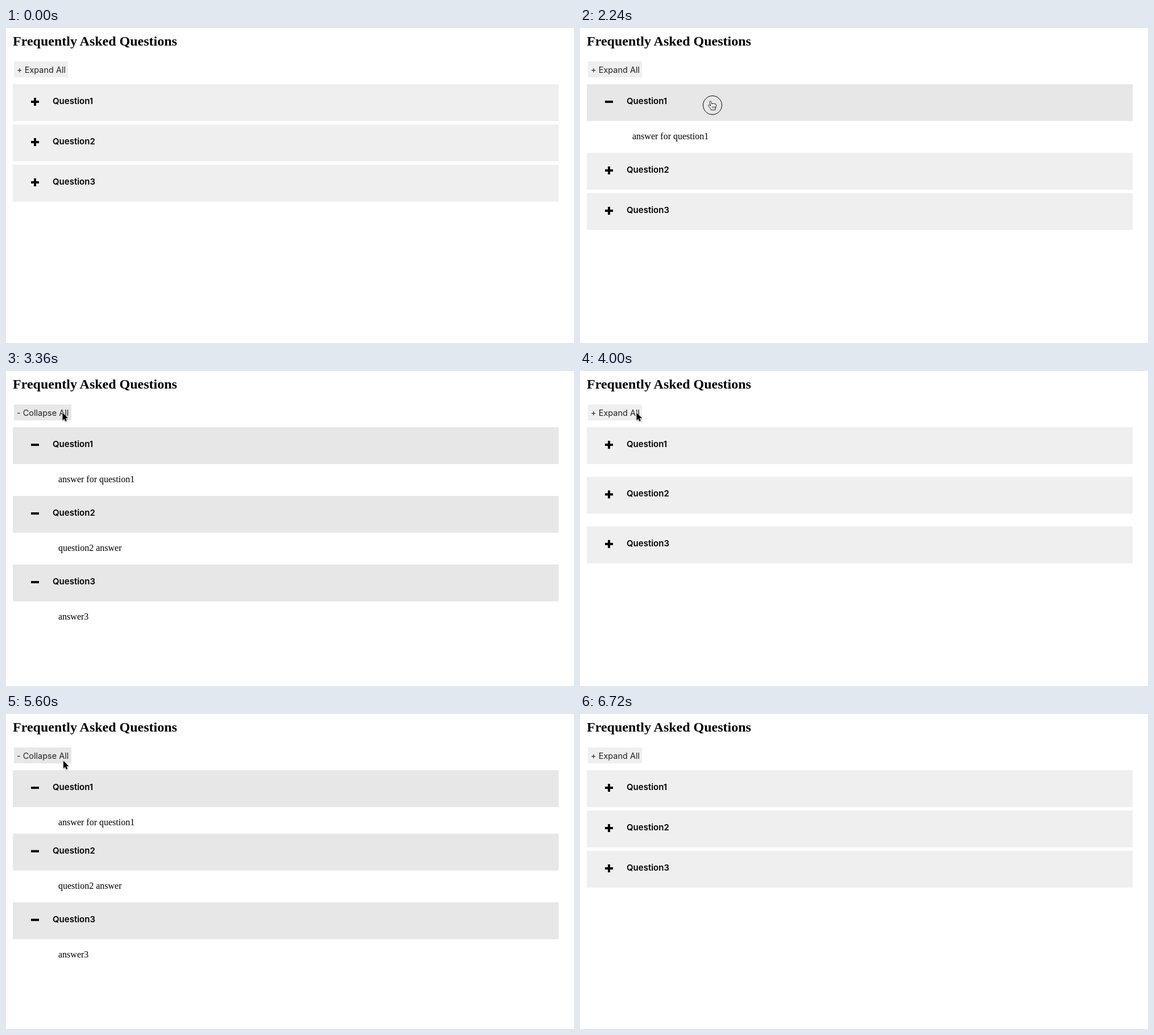
Recreate the animation shown at these times as an HTML page. Size 999 by 555 pixels, loop 7200 ms.

```html
<!DOCTYPE html>
<html lang="en">
<head>
<meta charset="utf-8">
<title>FAQ accordion</title>
<style>
  html, body { margin: 0; width: 100%; height: 100%; overflow: hidden; background: #fff; }
  svg { display: block; }
  .title { font: bold 24px "Liberation Serif", serif; }
  .answer { font: 16px "Liberation Serif", serif; }
  .question { font: 600 15px Inter, sans-serif; }
  .button { font: 14.5px Inter, sans-serif; }
</style>
</head>
<body>
<svg id="stage" width="999" height="555" viewBox="0 0 999 555">
  <text class="title" x="12" y="31">Frequently Asked Questions</text>
  <rect id="buttonBox" x="14" y="59" height="28"/>
  <text id="buttonText" class="button" x="19" y="79"></text>
  <g id="list"></g>
  <g id="cursor">
    <circle id="ring" r="16.5" fill="none" stroke="#000"/>
    <path id="arrow" d="M-4-7.5v13.2l3-2.8 2 4.7 2.3-1-2-4.5h4.2z" stroke="#fff" stroke-width="1" paint-order="stroke"
      style="filter:drop-shadow(0 1px 1px #0006)"/>
    <g id="hand" fill="#fff" stroke="#111" stroke-linejoin="round" stroke-linecap="round">
      <path d="M-2.6 8C-3.2 5.4-5 4-6.8 1.6-8-.2-6.2-1.4-4.6.2l1.3 1.2L-5-5.2c-.5-2.2 1.9-2.8 2.6-.8L-1-1.8c0-1.6 2.2-1.8 2.5-.2.4-1.3 2.3-1.1 2.5.3.6-1 2.3-.7 2.5.6C7 1.600 6 3.500 5.200 5.400L4.800 8z"/>
      <path d="M-.4 2v3.500M2 2v3.500M4.300 2v3.500" stroke-width=".8"/>
    </g>
  </g>
</svg>
<script>
  const LOOP = 7200, STEP = 160, SLIDE = 195;
  const ALL = [0, 1, 2];
  const ANSWERS = ["answer for question1", "question2 answer", "answer3"];

  const toggles = [
    { at: 1350, panels: [0], open: true },
    { at: 2300, panels: [0], open: false },
    { at: 3104, panels: ALL, open: true },
    { at: 3869, panels: ALL, open: false },
    { at: 4550, panels: [1], open: true },
    { at: 5441, panels: ALL, open: true },
    { at: 6110, panels: ALL, open: false }
  ];
  const clicks = [1280, 2240, 3040, 3840, 4480, 5440, 6080];
  const buttonClicks = [3040, 3840, 5440, 6080];

  // time, x, y of the cursor centre
  const route = [
    [160, 398, 272], [1120, 233, 136], [2400, 233, 136], [2880, 103.5, 81],
    [4160, 103.5, 81], [4480, 150, 204], [4800, 150, 204], [5280, 105, 90],
    [6240, 105, 90], [6560, 180, 491], [6720, 180, 491]
  ];

  const $ = id => document.getElementById(id);
  const clamp = v => Math.min(1, Math.max(0, v));
  const show = (el, on) => el.setAttribute("visibility", on ? "visible" : "hidden");

  function add(parent, tag, attrs, text = "") {
    const el = document.createElementNS("http://www.w3.org/2000/svg", tag);
    for (const name in attrs) el.setAttribute(name, attrs[name]);
    el.textContent = text;
    return parent.appendChild(el);
  }

  const items = ANSWERS.map((answer, i) => {
    const group = add($("list"), "g", {});
    const bar = add(group, "rect", { x: 12, width: 960, height: 65 });
    add(group, "path", { d: "M44 31h14", stroke: "#000", "stroke-width": 4 });
    const upright = add(group, "path", { d: "M51 24v14", stroke: "#000", "stroke-width": 4 });
    add(group, "text", { class: "question", x: 82, y: 35 }, "Question" + (i + 1));
    const panel = add(group, "svg", { y: 67, width: 999, overflow: "hidden" });
    add(panel, "text", { class: "answer", x: 92, y: 30 }, answer);
    return { group, bar, upright, panel };
  });

  function panelState(index, time) {
    let open = false, amount = 0;
    for (const { at, panels, open: next } of toggles) {
      if (time < at || !panels.includes(index)) continue;
      if (next !== open) {
        const progress = clamp((time - at) / SLIDE);
        amount = next ? progress : 1 - progress;
      }
      open = next;
    }
    return { open, amount };
  }

  function cursorAt(time) {
    const i = route.findIndex(point => point[0] > time);
    if (i < 1) return null;
    const [t0, x0, y0] = route[i - 1], [t1, x1, y1] = route[i];
    const p = (time - t0) / (t1 - t0), eased = p * p * (3 - 2 * p);
    return [x0 + (x1 - x0) * eased, y0 + (y1 - y0) * eased];
  }

  function drawButton(time) {
    const last = toggles.filter(t => t.panels === ALL && t.at <= time).pop();
    const expanded = !!last && last.open;
    const pressed = buttonClicks.includes(time);
    $("buttonBox").setAttribute("width", expanded ? 101 : 95);
    $("buttonBox").setAttribute("fill", expanded || pressed ? "#e7e7e7" : "#efefef");
    $("buttonText").textContent = expanded ? "- Collapse All" : "+ Expand All";
    $("buttonText").setAttribute("fill", pressed ? "#fff" : "#222");
  }

  function drawList(time) {
    let top = 99;
    return items.map((item, i) => {
      const { open, amount } = panelState(i, time), y = top;
      item.group.setAttribute("transform", `translate(0 ${y})`);
      item.bar.setAttribute("fill", open ? "#e7e7e7" : "#efefef");
      show(item.upright, !open);
      item.panel.setAttribute("height", 50 * amount);
      top += 71 + 50 * amount;
      return y;
    });
  }

  function drawCursor(time, tops) {
    const position = cursorAt(time);
    $("cursor").style.display = position ? "" : "none";
    if (!position) return;
    const [x, y] = position, tip = y - 7.5;
    const overBar = tops.some(top => tip >= top && tip < top + 65);
    $("cursor").setAttribute("transform", `translate(${x} ${y})`);
    show($("hand"), overBar);
    show($("arrow"), !overBar);
    show($("ring"), clicks.includes(time));
  }

  const start = performance.now();
  function frame() {
    const elapsed = (performance.now() - start) % LOOP;
    const time = Math.floor(elapsed / STEP) * STEP;
    drawButton(time);
    drawCursor(time, drawList(time));
    requestAnimationFrame(frame);
  }
  frame();
</script>
</body>
</html>
```
